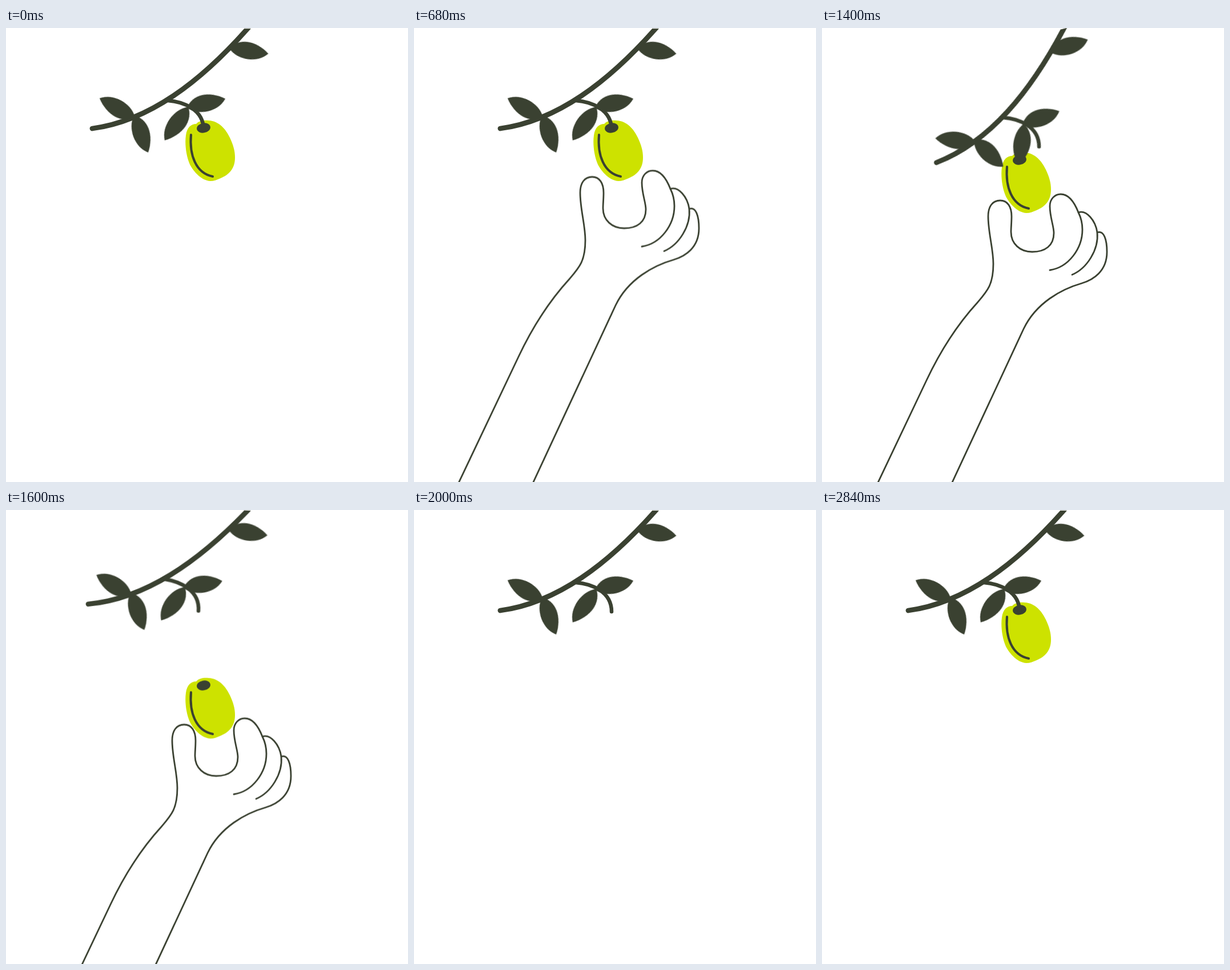
Animation of 704x795 px, one loop 3000 ms. Source, as an HTML page:

```html
<!DOCTYPE html>
<html lang="en">
<head>
<meta charset="utf-8">
<title>Picking an olive</title>
<style>
  html, body { margin: 0; width: 100%; height: 100%; overflow: hidden; background: #fff; }
  svg { display: block; width: 100vw; height: 100vh; }

  :root { --dark: #3a4131; }
  .line { fill: none; stroke: var(--dark); stroke-linecap: round; stroke-linejoin: round; }
  .dark { fill: var(--dark); }

  .hand, .olive, .grow, .branch, .flex { animation: 3s infinite; }
  .hand { animation-name: reach; }
  .olive { animation-name: fall; }
  .grow { animation-name: grow; animation-timing-function: step-end; transform-origin: 347px 190px; }
  .branch { animation-name: swing; transform-origin: 424px 0; }
  .flex { animation-name: flex; }

  @keyframes reach {
    0%, 1.333% { transform: translateY(600px); animation-timing-function: cubic-bezier(.8, 0, .25, 1); }
    28%, 33.333% { transform: translateY(-20px); animation-timing-function: cubic-bezier(.75, 0, .25, 1); }
    46.667% { transform: translateY(41px); animation-timing-function: cubic-bezier(.7, 0, .32, 1); }
    66.667%, 100% { transform: translateY(602px); }
  }
  @keyframes fall {
    0%, 33.333% { transform: translateY(0); animation-timing-function: cubic-bezier(.75, 0, .25, 1); }
    46.667% { transform: translateY(56px); animation-timing-function: cubic-bezier(.7, 0, .32, 1); }
    66.667% { transform: translateY(636px); animation-timing-function: step-end; }
    69.333%, 100% { transform: translateY(0); }
  }
  /* the new olive swells in 80 ms steps */
  @keyframes grow {
    0% { transform: scale(1); }
    69.333% { transform: scale(0); }
    73.333% { transform: scale(.044); }
    76% { transform: scale(.203); }
    78.66% { transform: scale(.555); }
    81.333% { transform: scale(.857); }
    84% { transform: scale(.975); }
    86.66%, 100% { transform: scale(1); }
  }
  @keyframes swing {
    0%, 33.333% { transform: rotate(0deg); animation-timing-function: cubic-bezier(.75, 0, .25, 1); }
    46.667% { transform: rotate(-13.7deg); animation-timing-function: cubic-bezier(.7, 0, .32, 1); }
    56.667% { transform: rotate(4.9deg); animation-timing-function: cubic-bezier(.75, 0, .25, 1); }
    66.667%, 100% { transform: rotate(0deg); }
  }
  /* each leaf and the twig bend by their own angle */
  @keyframes flex {
    0%, 33.333% { transform: rotate(0deg); animation-timing-function: cubic-bezier(.75, 0, .25, 1); }
    46.667% { transform: rotate(var(--a)); animation-timing-function: cubic-bezier(.7, 0, .32, 1); }
    56.667%, 100% { transform: rotate(0deg); }
  }
</style>
</head>
<body>
<svg viewBox="0 0 704 795" xmlns="http://www.w3.org/2000/svg">
  <defs>
    <path id="leaf" class="dark" d="M0 0C14 -21 44 -21 69 0C52 19 18 19 0 0Z"/>
    <clipPath id="cut"><rect x="-100" y="1" width="900" height="700"/></clipPath>
  </defs>

  <g class="olive">
    <g class="grow">
      <path fill="#cde200" d="M315 188C317 174 324 168 333 168C338 162 347 161 355 162C373 163 385 177 392 192C398 205 401 215 401 227C401 247 390 257 376 263C369 266 364 268 358 268C342 267 329 252 322 239C315 223 313 202 315 188Z"/>
      <ellipse class="dark" cx="346" cy="175" rx="12" ry="8.5" transform="rotate(-10 346 175)"/>
      <path class="line" stroke-width="4" d="M324 187C321 222 332 254 362 260"/>
    </g>
  </g>

  <g class="hand">
    <path class="line" stroke-width="2.8" style="fill:#fff" d="M41 875L183 576C208 523 240 475 272 440C290 419 300 408 300 372C300 345 291 318 291 289C291 271 299 261 312 261C325 261 332 272 332 289C332 300 331 308 331 316C331 337 347 351 368 351C391 351 406 340 406 318C406 306 399 290 399 271C399 258 408 250 418 250C432 250 442 264 449 282C463 277 479 296 482 317C494 313 499 330 499 351C499 385 475 400 455 406C420 416 375 440 353 486L172 875"/>
    <path class="line" stroke-width="2.8" d="M449 282C454 292 456 300 456 312C456 345 432 378 399 383M482 317C485 347 464 380 438 391"/>
  </g>

  <g class="branch">
    <g clip-path="url(#cut)">
      <path class="line" stroke-width="8.8" d="M151 176C250 163 340 95 424 0L434 -12"/>
      <g class="flex" style="--a:-13deg;transform-origin:392px 37px">
        <use href="#leaf" transform="translate(391 36) rotate(7.5)"/>
      </g>
      <g class="flex" style="--a:-10deg;transform-origin:226px 156px">
        <use href="#leaf" transform="translate(226 156) rotate(208) scale(1.02 1)"/>
      </g>
      <g class="flex" style="--a:-13deg;transform-origin:224px 153px">
        <use href="#leaf" transform="translate(224 153) rotate(69) scale(1.01 1)"/>
      </g>
      <g class="flex" style="--a:13.7deg;transform-origin:283px 127px">
        <path class="line" stroke-width="6.5" d="M283 127C310 129 346 142 346 178"/>
        <g class="flex" style="--a:-7deg;transform-origin:317px 140px">
          <use href="#leaf" transform="translate(317 140) rotate(-13.5)"/>
        </g>
        <g class="flex" style="--a:-29deg;transform-origin:319px 138px">
          <use href="#leaf" transform="translate(319 138) rotate(125) scale(1.04 1)"/>
        </g>
      </g>
    </g>
  </g>
</svg>
</body>
</html>
```
